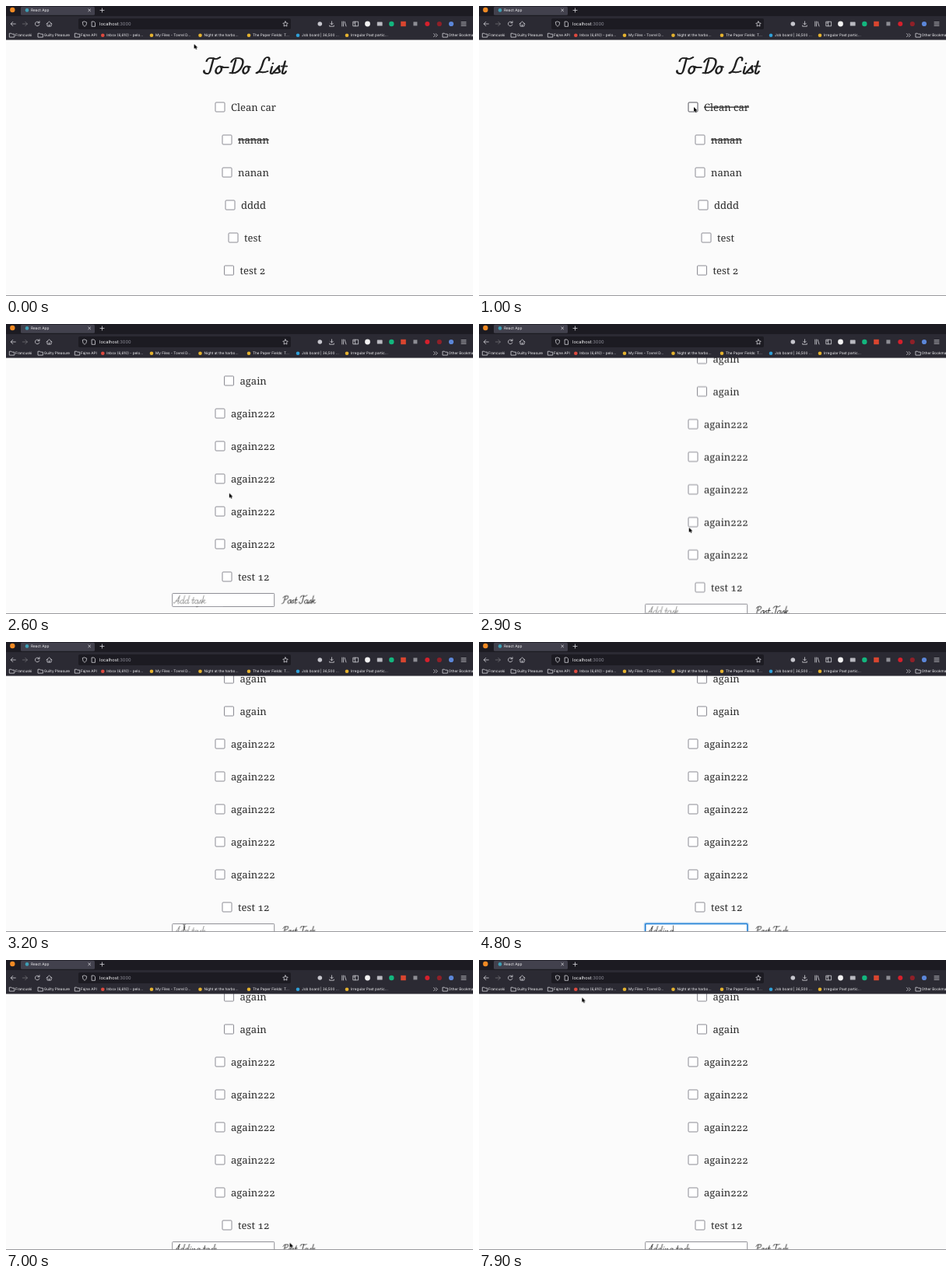
These frames come from a looping animation (600x373 px, 8 s). An HTML page:

```html
<!DOCTYPE html>
<html lang="en">
<head>
<meta charset="utf-8">
<title>To-Do List</title>
<style>
  html, body { margin: 0; width: 100%; height: 100%; overflow: hidden; background: #fbfbfb; }
  svg { display: block; width: 600px; height: 373px; }
  text { white-space: pre; text-rendering: geometricPrecision; }
  .ui { font-family: Inter, Roboto, sans-serif; fill: #f4f4f6; }
  .row { font: 300 13px "Noto Serif", serif; font-variant-numeric: oldstyle-nums; fill: #2c2c2c; }
  .struck { text-decoration: line-through; }
  .box { fill: #fff; stroke: #8b8b93; }
  .line { fill: none; stroke: #dcdce2; stroke-width: .75; stroke-linecap: round; stroke-linejoin: round; }
  .pen { fill: none; stroke-linecap: round; stroke-linejoin: round; }

  .page, .move { animation: scroll 8s infinite; }
  .move { animation: move 8s linear infinite; }
  .type, .toggle, .box { animation: 8s step-end infinite; }
  .type { animation-name: type; }

  @keyframes scroll {
    0%, 28% { transform: translateY(0); animation-timing-function: cubic-bezier(.4, 0, .4, 1); }
    32%, 33.6% { transform: translateY(-435px); animation-timing-function: ease-out; }
    37.5%, 100% { transform: translateY(-419px); }
  }
  @keyframes move {
    0%, 1% { transform: translate(241.6px, 49px); animation-timing-function: ease-in-out; }
    10%, 13.75% { transform: translate(276px, 130px); animation-timing-function: ease-in-out; }
    23.75%, 34% { transform: translate(286.8px, 217.6px); animation-timing-function: ease-in-out; }
    40% { transform: translate(229px, 367px); }
    43.75%, 71.1% { transform: translate(231px, 368px); }
    76.2% { transform: translate(347px, 369.6px); }
    81.2%, 86% { transform: translate(370px, 368px); animation-timing-function: ease-in-out; }
    96.2%, 98.6% { transform: translate(246px, 272px); }
    98.61%, 100% { transform: translate(132.3px, 48.3px); }
  }
  @keyframes type {
    0% { transform: translateX(0); }
    52.4% { transform: translateX(7.5px); }
    53.65% { transform: translateX(13.5px); }
    54.9% { transform: translateX(19.5px); }
    56.15% { transform: translateX(22.5px); }
    57.4% { transform: translateX(28.5px); }
    59.9% { transform: translateX(34px); }
    62.4% { transform: translateX(36.5px); }
    63.65% { transform: translateX(40.5px); }
    64.9% { transform: translateX(46px); }
    66.15% { transform: translateX(50px); }
    68.65%, 100% { transform: translateX(57px); }
  }
  @keyframes plain1 { 0% { opacity: 1 } 12.4%, 100% { opacity: 0 } }
  @keyframes struck1 { 0% { opacity: 0 } 12.4%, 100% { opacity: 1 } }
  @keyframes plain2 { 0% { opacity: 1 } 26.15%, 100% { opacity: 0 } }
  @keyframes struck2 { 0% { opacity: 0 } 26.15%, 100% { opacity: 1 } }
  @keyframes hover1 { 0%, 100% { stroke: #8b8b93 } 8.6% { stroke: #55555c } 15.8% { stroke: #8b8b93 } }
  @keyframes hover2 { 0%, 100% { stroke: #8b8b93 } 22% { stroke: #55555c } 28.6% { stroke: #8b8b93 } }
  @keyframes hint { 0% { opacity: 1 } 52.4%, 100% { opacity: 0 } }
  @keyframes focus { 0%, 100% { opacity: 0 } 49.9% { opacity: 1 } 81.15% { opacity: 0 } }
  @keyframes caret { 0%, 100% { opacity: 0 } 49.9% { opacity: 1 } 71.1% { opacity: 0 } }
  @keyframes arrow { 0%, 100% { opacity: 1 } 39.5% { opacity: 0 } 76.1% { opacity: 1 } }
  @keyframes beam { 0%, 100% { opacity: 0 } 39.5% { opacity: 1 } 52.4% { opacity: 0 } 71.1% { opacity: 1 } 76.1% { opacity: 0 } }
</style>
</head>
<body>
<svg id="stage" viewBox="0 0 600 373" xmlns="http://www.w3.org/2000/svg"></svg>
<script>
const ROW = 42, FIRST = 130;

// Brush lettering: upright strokes on a baseline at 0, slanted when placed.
const stem = (x, top) => `M${x} ${top}V-3q0 3 2 3t2.5-3`;
const bowl = 'M8-7.5a4 4.7 0 1 0 0 5';
const glyphs = {
  T: [13, 'M0-16q0-4 4-4t6 1 6-2M8-20V-4q0 5-4 4t-4-4'],
  D: [16, 'M5-18V-1M0-15q1-5 7-5 10 0 8 11-2 10-13 8'],
  L: [16, 'M12-17q0-4-3-4-4 0-4 7 0 8-2 11t-3 2q3-2 6-1t8-1'],
  P: [13, 'M5-18V-3q0 3-4 3M0-15q1-5 7-5 7 0 6 5-2 6-7 5'],
  A: [15, 'M0-2q2 3 4-2L10-20' + stem(10, -20) + 'M3-7h9'],
  o: [10, 'M5-9.5a3.5 4.7 0 1 0 1 0l4 1'],
  a: [11, bowl + stem(8, -9)],
  d: [12, bowl + stem(8, -20)],
  g: [11, bowl + 'M8-9V4q0 4-3 4t-3-4q3-3 9-5'],
  i: [6, stem(2, -9) + 'M2-13v-.5'],
  n: [12, 'M1-9V0q2-9 5-9t1.5 6q0 3 2 3t2.5-3'],
  s: [8, 'M0-2L5-10q-1 3 2 6t-5 3'],
  t: [8, stem(3, -16) + 'M0-9.5h7'],
  k: [11, 'M1 0V-20M1-4q2-6 5-6t-1 5l-2 .5q3 .5 4 3t4-1'],
  '-': [9, 'M0-8h7'],
  ' ': [5, '']
};

function letter(str, x, y, scale, color, nib = [0]) {
  let pos = 0, out = '';
  for (const ch of str) {
    const [advance, d] = glyphs[ch];
    if (d) for (const dx of nib) out += `<path d="${d}" transform="translate(${pos + dx} 0)"/>`;
    pos += advance;
  }
  return `<g class="pen" role="img" aria-label="${str}" stroke="${color}" stroke-width="1.7"
    transform="translate(${x} ${y}) scale(${scale}) skewX(-15)">${out}</g>`;
}

const label = (x, y, size, str, more = '') =>
  `<text class="ui" x="${x}" y="${y}" font-size="${size}" ${more}>${str}</text>`;
const dot = (x, y, r, fill) => `<circle cx="${x}" cy="${y}" r="${r}" fill="${fill}"/>`;
const rect = (x, y, w, h, fill, rx = 0) =>
  `<rect x="${x}" y="${y}" width="${w}" height="${h}" rx="${rx}" fill="${fill}"/>`;
const line = (d, more = '') => `<path class="line" d="${d}" ${more}/>`;
const folder = x => line(`M${x - 3} 35.2h2.2l.8.9h3v4h-6z`);
const anim = name => `style="animation-name:${name}"`;

// [text, left edge, state]
const rows = [
  ['Clean car', 289, 1], ['nanan', 298, 'struck'], ['nanan', 298, 2],
  ['dddd', 302], ['test', 306], ['test 2', 300.5],
  ...Array(4).fill(['again', 300.5]),
  ...Array(5).fill(['again222', 289]),
  ['test 12', 298]
];

function row([str, x, state], i) {
  const y = FIRST + i * ROW;
  const text = (cls, more = '') => `<text class="row ${cls}" x="${x}" y="${y + 4.8}" ${more}>${str}</text>`;
  const click = typeof state === 'number';
  const box = `<rect class="box" x="${x - 20}" y="${y - 6}" width="12" height="12" rx="1"
    ${click ? anim('hover' + state) : ''}/>`;
  return box + (click
    ? text('toggle', anim('plain' + state)) + text('struck toggle', anim('struck' + state))
    : text(state || ''));
}

function form() {
  const y = FIRST + (rows.length - 1) * ROW + 21, base = y + 13.6;
  return `<rect x="213.7" y="${y + .5}" width="131" height="17" rx=".8" fill="#fff" stroke="#8f8f96"/>`
    + letter('Adding task', 215.5, base, .5, '#2a2a2a')
    + `<g class="type"><rect x="216" y="-12" width="64" height="15.5" fill="#fff"
        transform="translate(0 ${base}) skewX(-15)"/></g>`
    + `<g class="toggle" ${anim('hint')}>${letter('Add task', 215.5, base, .5, '#8b8b8b')}</g>`
    + `<g class="toggle" ${anim('caret')}><g class="type">${rect(215.3, y + 2.5, .7, 13, '#333')}</g></g>`
    + `<g class="toggle" ${anim('focus')} fill="none" stroke="#1f7fd6">
        <rect x="213" y="${y - .2}" width="132.4" height="18.4" rx="1.5" stroke-width="2.6" opacity=".3"/>
        <rect x="213.7" y="${y + .5}" width="131" height="17" rx="1" stroke-width="1.4"/></g>`
    + letter('Post Task', 354, base, .5, '#1c1c1c');
}

const page = `<g class="page">${letter('To-Do  List', 253, 87, 1, '#222', [0, .8])}${rows.map(row).join('')}${form()}</g>`;

const tabs = rect(0, 0, 600, 13, '#1c1b22') + rect(19, .8, 95, 11, '#42414d', 1.6)
  + dot(8.3, 5, 3.2, '#f08a24') + dot(27, 5.4, 2.3, '#3f9fb5')
  + label(32, 7.1, 4.8, 'React App')
  + line('M105.8 4l2.8 2.8M108.6 4l-2.8 2.8') + line('M121 5.5h5M123.5 3v5');

const tools = rect(0, 13, 600, 30.6, '#2b2a33') + rect(93, 16, 273, 14, '#1c1b22', 1.8)
  + line('M12.3 23H6.3M8.8 20.4L6.2 23l2.6 2.6')
  + line('M21.3 23h6M24.8 20.4l2.6 2.6-2.6 2.6', 'opacity=".4"')
  + line('M42.7 21.5a2.8 2.8 0 1 0 .2 2.5M43 19.6v2.2h-2.2')
  + line('M52 23l3.5-3 3.5 3M53 22.4v3.6h5v-3.6M55.5 26v-2')
  + line('M101 20l2.7 1q0 4-2.7 5.4-2.7-1.4-2.7-5.4z')
  + line('M110.5 20h2.6l1.4 1.5v4.8h-4z')
  + label(120, 25.1, 5.75, 'localhost<tspan fill="#8f8f9a">:3000</tspan>')
  + line('M359 19.8l1 2.1 2.2.3-1.6 1.6.4 2.3-2-1.1-2 1.1.4-2.3-1.6-1.6 2.2-.3z')
  + dot(403.3, 23, 2.8, '#c6c6cd')
  + line('M418.5 19.8v4M416.7 22.2l1.8 1.8 1.8-1.8M415.7 25v1.2h5.6V25')
  + line('M431.8 20v6M433.6 20v6M435.2 20.2l1.8 5.8')
  + line('M446.2 20.2h6.4v5.6h-6.4zM448.7 20.2v5.6M446.8 22h1')
  + dot(464.5, 23, 3.4, '#f3f3f3') + rect(476.8, 20.5, 6.8, 5, '#b9b9c0', .6)
  + dot(495.3, 23, 3.2, '#13b67e') + rect(507.2, 19.8, 6.6, 6.4, '#d9452f')
  + rect(523.4, 20.4, 5, 5, '#8d8d94') + dot(541.3, 23, 3, '#d5202c')
  + dot(556.8, 23, 3.1, '#8f2028') + dot(572, 23, 3.1, '#5b86d8')
  + line('M585 20.8h6M585 23h6M585 25.2h6');

const marks = [
  [12, 'Francuski'], [48.7, 'Guilty Pleasure'], [96, 'Fajne API'],
  [129.3, 'Inbox (6,610) - pelo...', '#e04a3f'],
  [192, 'My Files - Tovrel D...', '#e5b32f'],
  [254.5, 'Night at the harbo...', '#e5b32f'],
  [317, 'The Paper Fields: T...', '#e5b32f'],
  [380, 'Job board | 36,500 ...', '#2fa0d8'],
  [443, 'Irregular Past partic...', '#e5b32f'],
  [568.6, 'Other Bookmarks']
].map(([x, str, color]) =>
  (color ? dot(x - 5, 37.7, 2.3, color) : folder(x - 4.3)) + label(x, 39.4, 4.7, str)).join('')
  + line('M549.5 35.6l2 2-2 2M552.3 35.6l2 2-2 2');

const cursor = `<g class="move">
  <path class="toggle" ${anim('arrow')} d="M0 0v6l1.5-1.3 1 2.3 1.1-.5-1-2.1h2z"
    fill="#000" stroke="#fff" stroke-width=".5" paint-order="stroke"/>
  <path class="toggle" ${anim('beam')} d="M-1.6-3.6q1.6 0 1.6 1V2.6q0 1-1.6 1M1.6-3.6q-1.6 0-1.6 1V2.6q0 1 1.6 1M-1 .8h2"
    fill="none" stroke="#333" stroke-width=".7"/></g>`;

document.getElementById('stage').innerHTML =
  rect(0, 0, 600, 373, '#fbfbfb') + page + tabs + tools + marks
  + rect(0, 372, 600, 1, '#9a9a9e') + cursor;
</script>
</body>
</html>
```
